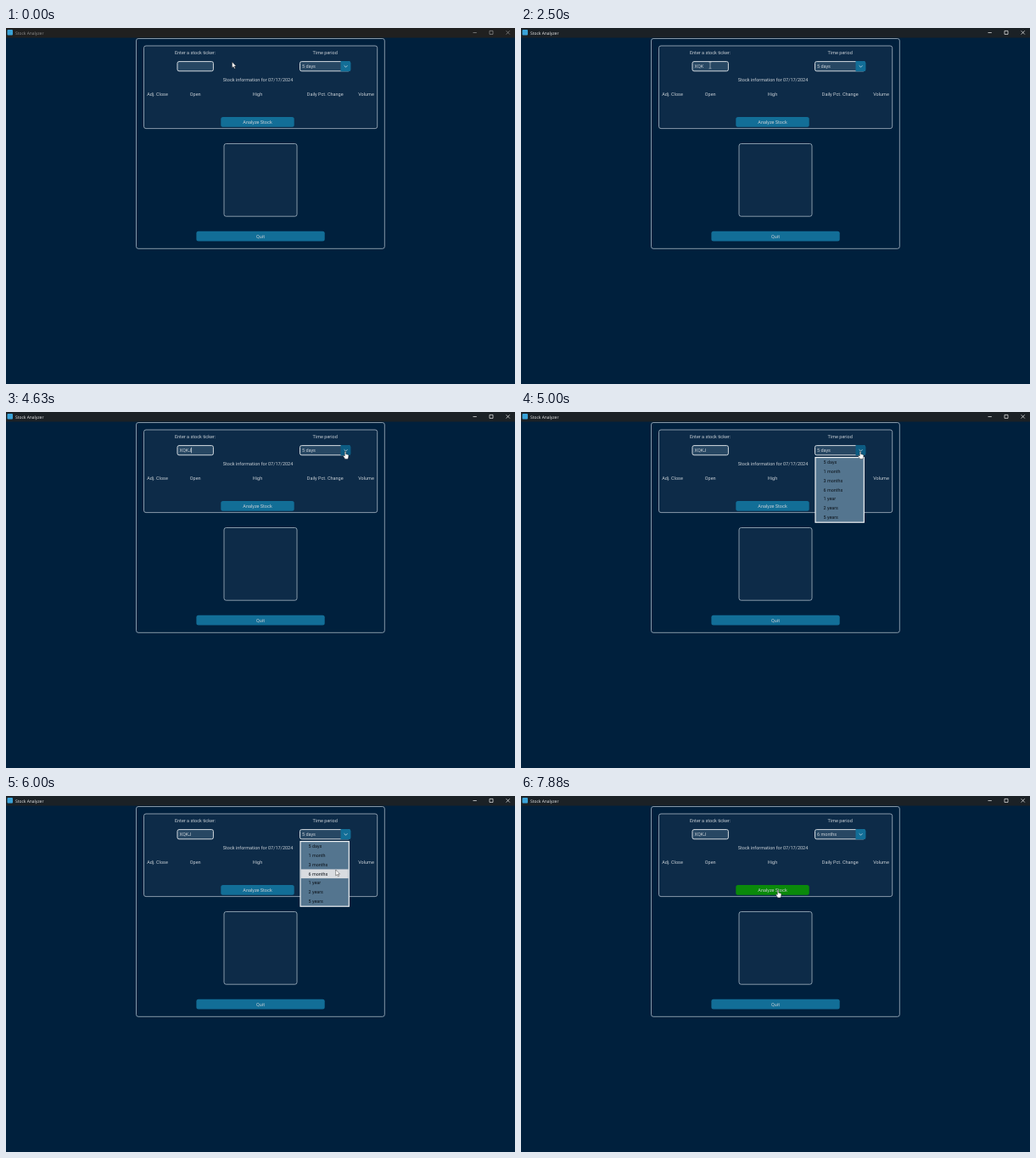
Recreate the animation shown at these times as an HTML page. Size 600x420 px, loop 8000 ms.

```html
<!DOCTYPE html>
<html lang="en">
<head>
<meta charset="utf-8">
<title>Stock Analyzer</title>
<style>
  html, body { margin: 0; width: 100%; height: 100%; overflow: hidden; background: #00203d; }
  svg { display: block; width: 100%; height: 100%; }
  text { font: 5.5px Roboto, sans-serif; fill: #c9d0d6; text-rendering: geometricPrecision; }
  .mid { text-anchor: middle; }
  .frame { stroke: #a9b7c4; stroke-width: .8; }
  .field { fill: #274763; stroke: #d3dae0; stroke-width: 1; }
  .button { fill: #126e97; }
  .menu text { fill: #0b1118; font-size: 5.4px; }
  #title { font: 4.95px "Open Sans", sans-serif; }
</style>
</head>
<body>
<svg id="stage" viewBox="0 0 600 420">
  <rect width="600" height="420" fill="#00203d"/>
  <rect id="bar" width="600" height="11.5"/>
  <rect x="1.5" y="2" width="6.5" height="6.5" rx="1" fill="#3aa3d8"/>
  <text id="title" x="11" y="7.5">Stock Analyzer</text>
  <path id="controls" d="M550.5 5.5h4.3M570 3.4h4v4h-4zM589.6 3.3l4.2 4.2M593.8 3.3l-4.2 4.2" fill="none" stroke-width=".7"/>

  <rect class="frame" x="153.5" y="12.5" width="292.8" height="247.8" rx="2.5" fill="none"/>
  <rect class="frame" x="162.5" y="21" width="275.2" height="97.6" rx="2.5" fill="#0d2b48"/>
  <rect class="frame" x="257" y="136.5" width="86" height="85.7" rx="2.5" fill="#0d2b48"/>
  <g id="labels"></g>

  <rect class="field" x="202" y="39.6" width="42.4" height="11.2" rx="2"/>
  <text id="entry" x="204.6" y="47"></text>
  <path id="caret" d="M0 41.8v6.6" stroke="#e6ebef" stroke-width=".7"/>

  <rect class="field" x="346.5" y="39.6" width="59" height="11.2" rx="2"/>
  <path id="arrowBox" d="M394.5 39.1h9.5a2.4 2.4 0 0 1 2.4 2.4v7.4a2.4 2.4 0 0 1-2.4 2.4h-9.5z"/>
  <path d="M398.6 44.3l1.9 1.9 1.9-1.9" fill="none" stroke="#d5dfe6" stroke-width=".8"/>
  <text id="period" x="349" y="47"></text>

  <rect id="analyze" x="253.3" y="105" width="86.4" height="11.8" rx="2.5"/>
  <text class="mid" x="296.5" y="112.7">Analyze Stock</text>
  <rect class="button" x="224.4" y="239.7" width="151.3" height="11.9" rx="2.5"/>
  <text class="mid" x="300" y="247.6">Quit</text>

  <g id="menu" class="menu">
    <rect x="347" y="53.6" width="57.3" height="76.6" fill="#54758f" stroke="#f0f2f4" stroke-width="1.2"/>
    <rect id="hover" x="347.6" width="56.1" height="10.7" fill="#d9dce0"/>
    <g id="items"></g>
  </g>

  <g id="pointer">
    <path id="arrow" d="M0 0v7l1.6-1.5 1.1 2.4 1.1-.5-1.1-2.3h2.1z" fill="#fff" stroke="#111" stroke-width=".4"/>
    <path id="beam" d="M-1.4-3.6h1l.4.4.4-.4h1M0-3.2v6.4M-1.4 3.6h1l.4-.4.4.4h1" fill="none" stroke="#d4dade" stroke-width=".6"/>
    <path id="hand" d="M-.7.6a.7.7 0 0 1 1.4 0v2.6l2.3.5q1 .3.9 1.4l-.4 2.4-.6 1.4h-3.2l-2.1-3.1q-.5-1 .4-1.1l1.3.8z" fill="#fff" stroke="#111" stroke-width=".4"/>
  </g>
</svg>
<script>
const LOOP = 8000, STEP = 125;
const ROW_TOP = 54.1, ROW = 10.78;
const TICKER = "XQKJ", KEY_TIMES = [1375, 2000, 2250, 3000];
const PERIODS = ["5 days", "1 month", "3 months", "6 months", "1 year", "2 years", "5 years"];
const MENU_OPEN = 5000, MENU_CLOSE = 6750;

// Pointer stops: time, x, y
const STOPS = [
  [0, 266.5, 40], [0, 266.5, 40], [875, 223, 44.2], [3250, 223, 44.2],
  [3625, 252.7, 43], [3875, 252.7, 43], [4625, 400, 46.5], [5375, 400, 46.5],
  [6000, 388.7, 87], [6250, 386.3, 92], [6750, 386.3, 92], [7500, 303, 111], [8000, 303, 111]
];

const LABELS = [
  ["Enter a stock ticker:", 223, 30.6], ["Time period", 376.2, 30.6],
  ["Stock information for 07/17/2024", 297, 63.4],
  ["Adj. Close", 178.5, 79.8], ["Open", 223.2, 79.8], ["High", 296.5, 79.8],
  ["Daily Pct. Change", 376.2, 79.8], ["Volume", 424.5, 79.8]
];

const el = id => document.getElementById(id);
const show = (id, on) => el(id).setAttribute("visibility", on ? "visible" : "hidden");
const paint = (id, color, attr = "fill") => el(id).setAttribute(attr, color);
const inside = ([x, y], x0, y0, x1, y1) => x >= x0 && x <= x1 && y >= y0 && y <= y1;

function addText(parent, text, x, y, cls) {
  const node = document.createElementNS("http://www.w3.org/2000/svg", "text");
  node.setAttribute("x", x);
  node.setAttribute("y", y);
  if (cls) node.setAttribute("class", cls);
  node.textContent = text;
  el(parent).append(node);
}

LABELS.forEach(([text, x, y]) => addText("labels", text, x, y, "mid"));
PERIODS.forEach((text, i) => addText("items", text, 356.6, ROW_TOP + ROW * i + 7.2));

function pointerAt(t) {
  let i = 1;
  while (i < STOPS.length - 1 && STOPS[i][0] <= t) i++;
  const [t0, x0, y0] = STOPS[i - 1], [t1, x1, y1] = STOPS[i];
  const p = Math.min(1, (t - t0) / (t1 - t0));
  const e = p * p * (3 - 2 * p);
  return [x0 + (x1 - x0) * e, y0 + (y1 - y0) * e];
}

// Lit for 600 ms, dark for 300 ms, in two separate focus periods
function caretOn(t) {
  if (t < 950 || (t >= MENU_OPEN && t < MENU_CLOSE)) return false;
  const start = t < MENU_OPEN ? 950 : 6375;
  return (t - start) % 900 < 600;
}

function draw(t) {
  const pos = pointerAt(t);
  const active = t >= 875;
  const menuOpen = t >= MENU_OPEN && t < MENU_CLOSE;
  paint("bar", active ? "#1b2126" : "#202020");
  paint("title", active ? "#f2f2f2" : "#929292", "style");
  el("title").style.fill = active ? "#f2f2f2" : "#929292";
  paint("controls", active ? "#f2f2f2" : "#929292", "stroke");

  const entry = el("entry");
  entry.textContent = TICKER.slice(0, KEY_TIMES.filter(k => k <= t).length);
  const end = entry.textContent ? entry.getComputedTextLength() : 0;
  el("caret").setAttribute("transform", `translate(${204.9 + end} 0)`);
  show("caret", caretOn(t));

  el("period").textContent = PERIODS[t < MENU_CLOSE ? 0 : 3];
  const row = Math.floor((pos[1] - ROW_TOP) / ROW);
  show("menu", menuOpen);
  show("hover", menuOpen && row >= 0);
  el("hover").setAttribute("y", ROW_TOP + ROW * row);

  const overEntry = inside(pos, 202, 39, 245, 51) || inside(pos, 346, 39, 394, 51);
  const overArrow = inside(pos, 394, 39, 406, 51);
  const overAnalyze = inside(pos, 253, 105, 340, 117);
  paint("arrowBox", overArrow ? "#0c5c83" : "#126e97");
  paint("analyze", overAnalyze ? "#0a8a0a" : "#126e97");

  const shape = overArrow || overAnalyze ? "hand" : overEntry ? "beam" : "arrow";
  ["arrow", "beam", "hand"].forEach(id => show(id, id === shape));
  el("pointer").setAttribute("transform", `translate(${pos})`);
}

const began = performance.now();
function tick() {
  const t = (performance.now() - began) % LOOP;
  draw(Math.floor(t / STEP) * STEP);
  requestAnimationFrame(tick);
}
draw(0);
requestAnimationFrame(tick);
</script>
</body>
</html>
```
